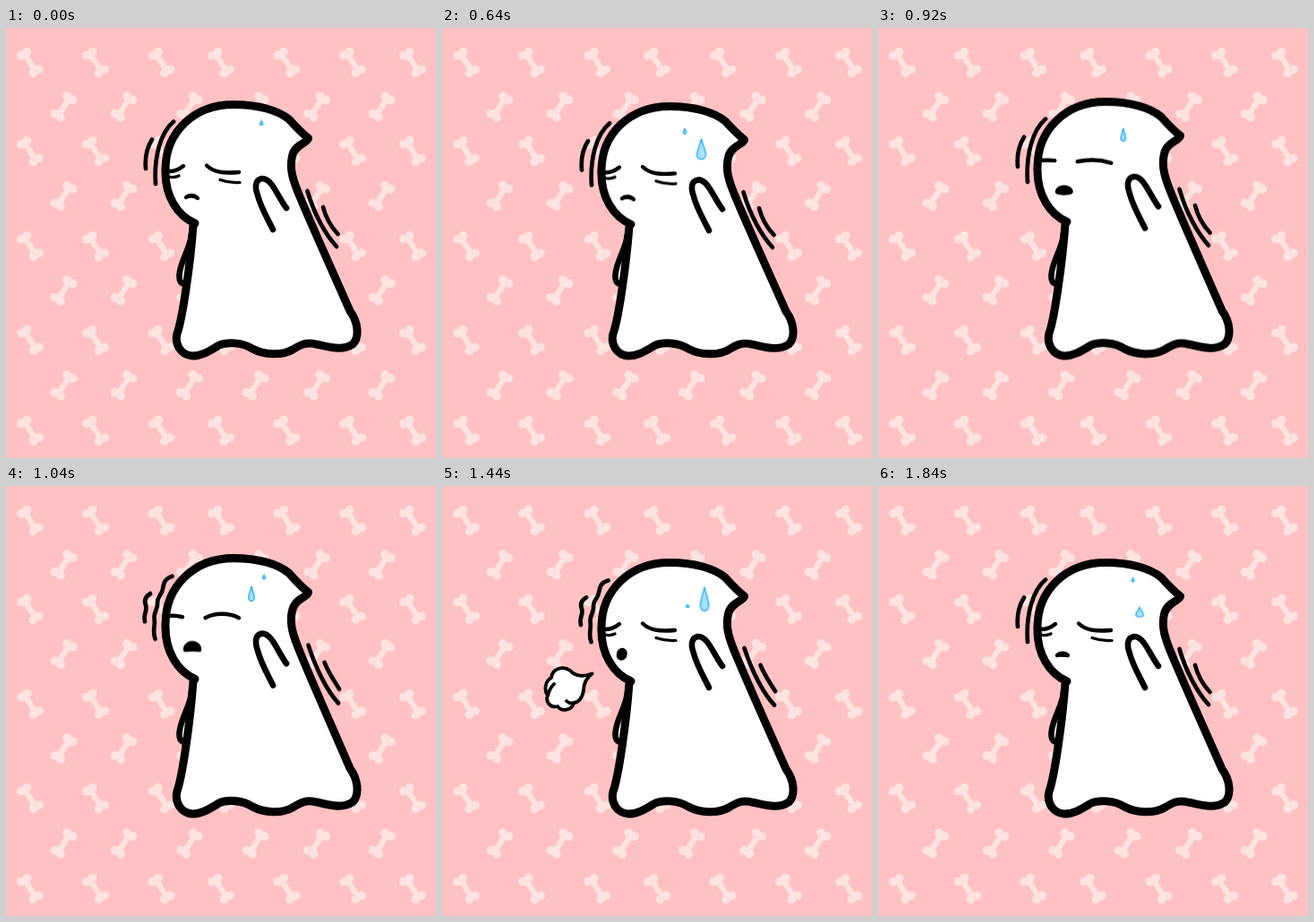
Write an HTML page that moves like this. It is 480 by 480 pixels and loops after 1.88 s.

```html
<!DOCTYPE html>
<html lang="en">
<head>
<meta charset="utf-8">
<title>Sighing ghost</title>
<style>
html, body { margin: 0; width: 100%; height: 100%; overflow: hidden; background: #ffc1c1; }
svg { display: block; width: 100vw; height: 100vh; }
.line { fill: none; stroke: #000; stroke-linecap: round; stroke-linejoin: round; }

/* Every animation is paused and scrubbed by --t (milliseconds). */
.anim { animation: 1880ms linear calc(var(--t, 0) * -1ms) infinite paused; }

#body { animation-name: breathe; transform-origin: 0 366px; }
@keyframes breathe {
  0%, 17% { transform: scaleY(1); }
  34% { transform: scaleY(.993); }
  42.6% { transform: scaleY(1.005); }
  55.3% { transform: scaleY(1.0176); }
  58.5% { transform: scaleY(1.024); }
  61.7% { transform: scaleY(1.019); }
  68% { transform: scaleY(1.003); }
  76.6%, 100% { transform: scaleY(1); }
}

#lidR { animation-name: lidR; }
@keyframes lidR {
  0%, 35%, 71%, 100% { d: path("M224 153.5 C232 161 242 162.5 260 161"); }
  42.6% { d: path("M223 152.5 C234 157 248 158 261 157"); }
  52%, 62% { d: path("M222.5 151 C233 145.500 248 145 260 151"); }
}
#lidL { animation-name: lidL; }
@keyframes lidL {
  0%, 35%, 71%, 100% { d: path("M180 160 C187 160.500 193 158 198 154"); }
  42.6% { d: path("M180 153 C187 154 193 153 198 151"); }
  52%, 62% { d: path("M180 149 C186 148 191 148.500 197 150"); }
}
#bags { animation-name: bags; }
@keyframes bags {
  0%, 37%, 72%, 100% { opacity: 1; transform: none; }
  42.6% { opacity: .5; transform: translateY(-4px); }
  47%, 65% { opacity: 0; transform: translateY(-5px); }
}

#mouth { animation-name: mouth; }
@keyframes mouth {
  0%, 35% { d: path("M201 189 C204 186 210 186 214 190 C210 187 204 187 201 189Z"); }
  42.6% { d: path("M200 184 C200 180 215 180 215 184 C215 188 200 188 200 184Z"); }
  55.3%, 62% { d: path("M200 186 C200 176 216 176 216 186 C213 185.500 203 185.500 200 186Z"); }
  69%, 87% { d: path("M197 188 C197 182 205 181 204.500 187.500 C204 194 196 194 197 188Z"); }
  94%, 100% { d: path("M200 189 C203 186 209 186 212 189 C209 189 203 188 200 189Z"); }
}

#tear { fill: #a5e2ff; stroke: #27a9f2; stroke-width: 1.3; vector-effect: non-scaling-stroke; }
#drop1 { animation-name: drop1; }
@keyframes drop1 {
  0% { transform: translate(285px, 106px) scale(.33, .2); }
  17% { transform: translate(290px, 123px) scale(.8, 1.05); }
  34% { transform: translate(289.5px, 135.5px) scale(1, 1); }
  42.6% { transform: translate(289px, 141px) scale(.95, .52); }
  46.8% { transform: translate(289px, 143px) scale(0, 0); }
  93.6% { transform: translate(284px, 104px) scale(0, 0); }
  97.9% { transform: translate(284.5px, 105px) scale(.3, .17); }
  100% { transform: translate(285px, 106px) scale(.33, .2); }
}
#drop2 { animation-name: drop2; }
@keyframes drop2 {
  0%, 31.9% { transform: translate(271px, 113px) scale(0, 0); }
  34% { transform: translate(271px, 115px) scale(.3, .28); }
  42.6% { transform: translate(273.5px, 118px) scale(.45, .55); }
  55.3% { transform: translate(274px, 120.5px) scale(.65, .72); }
  66% { transform: translate(274px, 128px) scale(.75, .62); }
  76.6% { transform: translate(274px, 134px) scale(.36, .13); }
  78.7%, 100% { transform: translate(274px, 135px) scale(0, 0); }
}
#drop3 { animation-name: drop3; }
@keyframes drop3 {
  0%, 51% { transform: translate(288px, 100px) scale(0, 0); }
  55.3% { transform: translate(288px, 101.5px) scale(.33, .2); }
  76.6% { transform: translate(293px, 126.5px) scale(.95, 1.18); }
  87.2% { transform: translate(292.5px, 134px) scale(1, .95); }
  97.9% { transform: translate(292px, 141px) scale(.85, .48); }
  100% { transform: translate(292px, 142px) scale(0, 0); }
}

#puff { animation-name: puff; transform-origin: 168px 209px; }
@keyframes puff {
  0%, 67% { opacity: 0; transform: translate(20px, -8px) scale(.3); }
  68% { opacity: 1; transform: translate(20px, -8px) scale(.4); }
  76.6% { opacity: 1; transform: none; }
  85% { opacity: 1; transform: translate(-32px, 0); }
  92% { opacity: .2; transform: translate(-56px, 0); }
  93.6%, 100% { opacity: 0; transform: translate(-57px, 0); }
}

.anim.calm, .anim.wavy { animation-duration: 320ms; animation-timing-function: step-end; }
.calm { animation-name: calm; }
.wavy { animation-name: wavy; }
@keyframes calm { 0%, 75%, 100% { opacity: 1; } 25% { opacity: 0; } }
@keyframes wavy { 0%, 75%, 100% { opacity: 0; } 25% { opacity: 1; } }
</style>
</head>
<body>
<svg viewBox="0 0 480 480">
  <defs>
    <g id="bone" fill="#ffe3e1">
      <path d="M-6 -9 L6 9" stroke="#ffe3e1" stroke-width="6.500"/>
      <circle cx="-10" cy="-7.800" r="4.900"/><circle cx="-3.500" cy="-11.800" r="4.900"/>
      <circle cx="10" cy="7.800" r="4.900"/><circle cx="3.500" cy="11.800" r="4.900"/>
    </g>
    <path id="tear" d="M0 -12 C1.500 -5 5 1 5 6 A5 5 0 0 1 -5 6 C-5 1 -1.500 -5 0 -12Z"/>
  </defs>
  <g id="bones"></g>

  <path class="line" style="fill:#fff" stroke-width="6.600" d="M207 230 C206 246 194 261 193.500 276 C193 284 197 287 202 285"/>

  <g id="body" class="anim">
    <g class="line" stroke-width="4.700">
      <g class="anim calm">
        <path d="M163 124.500 C157 134 155 146 156 157"/>
        <path d="M187 104.500 C172 117 165 145 167 174"/>
        <path d="M336.500 182 C344 208 357 231 369 244"/>
        <path d="M354 200 C357 212 363 222 370.500 230"/>
      </g>
      <g class="anim wavy">
        <path d="M161 124.500 C155 128 154 132 156 137 C158 144 153 146 155 155"/>
        <path d="M185.500 105.500 C177 108 176 113 175 119 C174 126 169 127 169 134 C170 141 165 144 165.500 151 C167 160 163 165 166.500 174"/>
        <path d="M337.500 181 C346 207 359 232 371 244.500"/>
        <path d="M355.500 200 C360 211 366 220 372 229"/>
      </g>
    </g>

    <path class="line" style="fill:#fff" stroke-width="9" d="M211 218 C192 210 177 188 178 158 C178 116 210 85.500 254 85.500
      C282 85.500 304 92 316 102 C325 112 331 118 337.500 123 C337 128 322 130 319.500 143
      C316 157 320 170 330 193 C342 222 370 284 384 316 C393 328 395 345 387 353
      C375 361 361 356 346 353 C335 350 328 354 320 359 C308 366 288 365 275 358
      C264 351 247 350 238 354 C228 360 219 366 208 366 C195 365 188 353 191 341
      C197 325 206 262 209 220Z"/>
    <path class="line" stroke-width="6.600" d="M298 225 C291 211 284 199 281 187 C276 173 281 168.500 286 168 C297 168 303 188 313 201"/>
    <g class="line" stroke-width="4.400">
      <path id="lidR" class="anim"/>
      <path id="lidL" class="anim"/>
      <g id="bags" class="anim" stroke-width="3.200">
        <path d="M239 169.500 C246 172 254 173 261 172.500"/>
        <path d="M182 166 C186 167 190 166.500 193 165"/>
      </g>
      <path id="mouth" class="anim" style="fill:#000"/>
    </g>
  </g>

  <g id="drop1" class="anim"><use href="#tear"/></g>
  <g id="drop2" class="anim"><use href="#tear"/></g>
  <g id="drop3" class="anim"><use href="#tear"/></g>

  <path id="puff" class="line anim" style="fill:#fff" stroke-width="3.800" d="M167.500 209.500 C160 215 158 221 158 228 C157 236 152 242 147 242
    C145 251 133 252 129 246 C121 248 115 241 118 234 C113 227 116 217 122 214
    C123 204 135 200 143 206 C149 213 158 213 167.500 209.500Z M125 221 C120 226 119 230 118 234 M147 242 C144 243 141 242 139 240"/>
</svg>
<script>
const bones = document.getElementById("bones");
function addRows(rows, columns, flip) {
  for (const y of rows) for (const x of columns) {
    const bone = document.createElementNS("http://www.w3.org/2000/svg", "use");
    bone.setAttribute("href", "#bone");
    bone.setAttribute("transform", `translate(${x} ${y}) scale(${flip} 1)`);
    bones.append(bone);
  }
}
addRows([38.5, 137.5, 243.5, 348.5, 449.5], [27, 100, 173.5, 240, 313.5, 387, 454], 1);
addRows([88, 187.5, 293, 399], [64.5, 131.5, 205, 278.5, 347, 419.5], -1);

const LOOP = 1880;
const start = performance.now();
function tick() {
  const time = (performance.now() - start) % LOOP;
  const step = time < 480 ? 80 : 40;
  document.documentElement.style.setProperty("--t", Math.floor(time / step) * step);
  requestAnimationFrame(tick);
}
tick();
</script>
</body>
</html>
```
